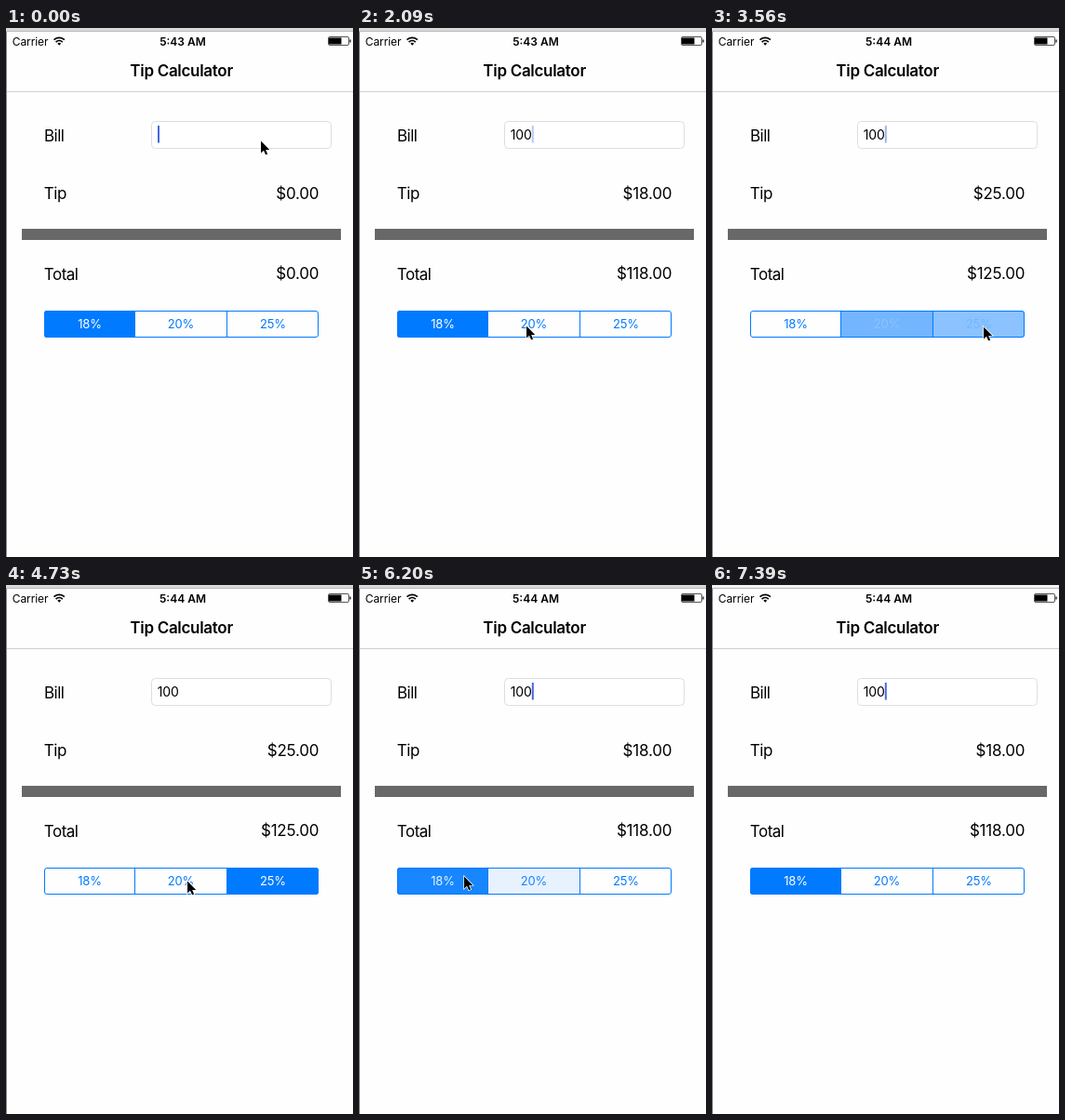
Write an HTML page that moves like this. It is 373x569 px and loops after 7490 ms.

```html
<!DOCTYPE html>
<html lang="en">
<head>
<meta charset="utf-8">
<title>Tip Calculator</title>
<style>
  html, body { margin: 0; width: 100%; height: 100%; overflow: hidden; background: #fefefe; }
  svg { display: block; }
  text { font: 17px Inter, "Open Sans", sans-serif; letter-spacing: -.5px; }
  .status { font-size: 12px; letter-spacing: -.1px; }
  .clock { font-weight: 600; letter-spacing: 0; }
  .title { font-weight: 600; letter-spacing: -.3px; }
  .field { font-size: 14px; letter-spacing: -.1px; }
  .seg { font-size: 13px; letter-spacing: -.2px; }
  .mid { text-anchor: middle; }
  .amount { text-anchor: end; letter-spacing: -.2px; }
</style>
</head>
<body>
<svg width="373" height="569" viewBox="0 0 373 569">
  <rect width="373" height="569" fill="#fefefe"/>
  <rect id="strip" width="373" height="3"/>
  <rect y="3" width="373" height="1" fill="#b9b9b9"/>
  <rect y="4" width="1" height="565" fill="#8e8e8e"/>
  <rect x="1" y="68" width="372" height="1" fill="#cfcfcf"/>

  <text class="status" x="6.8" y="18.5">Carrier</text>
  <g fill="none" stroke="#000" stroke-width="1.7">
    <path d="M51.5 12.7a8.2 8.2 0 0 1 11.4 0M53.6 15.1a5.2 5.2 0 0 1 7.2 0"/>
    <path d="M57.2 18.8l-1.9-2.1a2.8 2.8 0 0 1 3.8 0z" fill="#000" stroke="none"/>
  </g>
  <text class="status clock mid" id="clock" x="190" y="18.5"></text>
  <rect x="346.5" y="9.5" width="22" height="9" rx="1.5" fill="none" stroke="#555"/>
  <rect x="347" y="10.5" width="13.5" height="7" fill="#000"/>
  <rect x="369.3" y="12.5" width="1.5" height="3" fill="#333"/>
  <text class="title mid" x="188.6" y="52">Tip Calculator</text>

  <text x="41" y="121.5">Bill</text>
  <rect x="156.5" y="100.5" width="193" height="29" rx="4" fill="#fff" stroke="#dedede"/>
  <text class="field" id="bill" x="162.7" y="120"></text>
  <rect id="caret" y="105" width="2" height="18.5" fill="#4468dc"/>
  <text x="40.8" y="183.5">Tip</text>
  <text class="amount" id="tip" x="336.3" y="183.5"></text>
  <rect x="17" y="216" width="343" height="12" fill="#686868"/>
  <text x="40.8" y="270.5">Total</text>
  <text class="amount" id="total" x="336.3" y="270"></text>

  <clipPath id="round"><rect x="41" y="304" width="295" height="29" rx="3"/></clipPath>
  <g id="fills" clip-path="url(#round)" fill="#007aff">
    <rect x="41" y="304" width="98" height="29"/>
    <rect x="138" y="304" width="100" height="29"/>
    <rect x="237" y="304" width="99" height="29"/>
  </g>
  <path d="M138.5 304v29M237.5 304v29" stroke="#007aff"/>
  <rect x="41.5" y="304.5" width="294" height="28" rx="2.5" fill="none" stroke="#007aff"/>
  <g id="labels">
    <text class="seg mid" x="90" y="323.2">18%</text>
    <text class="seg mid" x="188" y="323.2">20%</text>
    <text class="seg mid" x="287" y="323.2">25%</text>
  </g>

  <g id="pointer">
    <g transform="translate(.6 1) scale(.9)">
      <path d="M1 1.5V16l3.4-3.2 2.4 5.2 2.3-1-2.2-5h4.6z" opacity=".22"/>
      <path d="M.5.5V15l3.3-3.1 2.3 5.1 2.3-1-2.2-5h4.5z" stroke="#fff" stroke-width="1.6" paint-order="stroke"/>
    </g>
  </g>
</svg>
<script>
// The screen refreshes in even ticks; every time below is counted in them.
const LOOP = 7490, TICK = 147.8, LEAD = 10;
const TYPE_START = 4, BLINK_START = 11, BLINK_PERIOD = 6.6;
const RATES = [18, 20, 25];

const moves = [
  { from: 0, to: 2, x: 277, y: 122 },
  { from: 11, to: 13, x: 192, y: 334 },
  { from: 13, to: 14, x: 179, y: 319 },
  { from: 17, to: 21, x: 291, y: 320 },
  { from: 26, to: 29, x: 199, y: 332 },
  { from: 31, to: 32, x: 194, y: 317 },
  { from: 36.4, to: 40, x: 112, y: 312 },
  { from: 43, to: 44, x: 135, y: 322 },
  { from: 44, to: 48, x: 290, y: 600 }
];
const taps = [
  { at: 15, segment: 1 },
  { at: 23, segment: 2 },
  { at: 33, segment: 1 },
  { at: 40, segment: 0 }
];

const $ = id => document.getElementById(id);
const clamp = v => Math.min(1, Math.max(0, v));
const mix = (a, b, k) => a + (b - a) * k;
const easeOut = k => 1 - (1 - k) ** 2;
const money = value => "$" + value.toFixed(2);
const blueToWhite = k => `rgb(${mix(0, 255, k)},${mix(122, 255, k)},255)`;
const setText = (id, value) => {
  if ($(id).textContent !== value) $(id).textContent = value;
};

function pointerAt(tick) {
  let x = 273, y = 120;
  for (const move of moves) {
    const k = easeOut(clamp((tick - move.from) / (move.to - move.from)));
    x = mix(x, move.x, k);
    y = mix(y, move.y, k);
  }
  return `translate(${x} ${y})`;
}

// The caret blinks softly, but stays solid while typing.
function caretAlpha(tick) {
  if (tick > TYPE_START && tick < BLINK_START) return 1;
  const phase = tick < BLINK_START ? .88 + tick / BLINK_PERIOD : (tick - BLINK_START) / BLINK_PERIOD;
  return clamp(.5 + 1.3 * Math.cos(2 * Math.PI * (phase - .72)));
}

// A tap tints its segment, then cross-fades from the previous one.
function segmentState(tick) {
  let selected = 0, levels = [1, 0, 0];
  for (const { at, segment } of taps.filter(tap => tap.at <= tick)) {
    const fade = clamp((tick - at) / 2.2);
    levels = levels.map((level, i) => i === segment ? Math.max(.12, fade) : level * (1 - fade));
    if (fade > 0) selected = segment;
  }
  return { selected, levels };
}

function draw(tick) {
  const bill = "100".slice(0, Math.max(0, tick - TYPE_START));
  const { selected, levels } = segmentState(tick);
  const tip = bill * RATES[selected] / 100;
  setText("bill", bill);
  setText("tip", money(tip));
  setText("total", money(+bill + tip));
  setText("clock", tick < 20 ? "5:43 AM" : "5:44 AM");

  $("caret").setAttribute("x", 163 + 7.6 * bill.length);
  $("caret").setAttribute("opacity", caretAlpha(tick));
  $("pointer").setAttribute("transform", pointerAt(tick));
  $("strip").setAttribute("fill", tick < 50 ? "#dadada" : "#f4f4f4");

  levels.forEach((level, i) => {
    $("fills").children[i].setAttribute("opacity", level);
    $("labels").children[i].setAttribute("fill", blueToWhite(level));
  });
}

const start = performance.now();
function play() {
  const time = (performance.now() - start) % LOOP;
  draw(Math.floor((time + LEAD) / TICK));
  requestAnimationFrame(play);
}
play();
</script>
</body>
</html>
```
